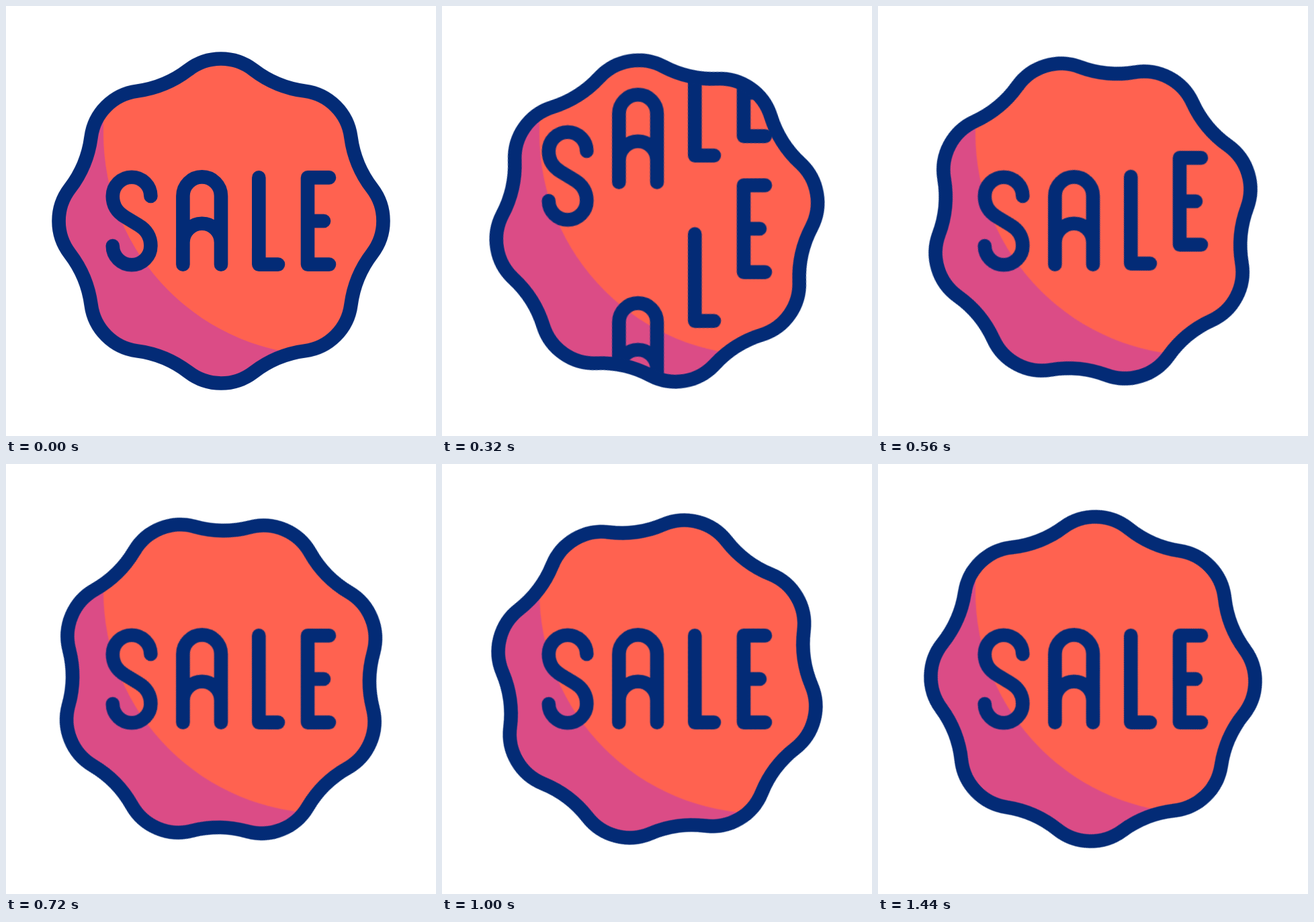
An HTML page that plays this animation: 640x640 px, repeating every 1480 ms.

```html
<!DOCTYPE html>
<html lang="en">
<head>
<meta charset="utf-8">
<title>Sale badge</title>
<style>
  html, body { margin: 0; width: 100%; height: 100%; overflow: hidden; background: #fff; }
  svg { display: block; width: 100vw; height: 100vh; }

  .line { fill: none; stroke: #032b76; stroke-width: 20.6; stroke-linecap: round; stroke-linejoin: round; }

  .spin, .unspin { transform-origin: 320px 320px; animation: spin 1480ms linear infinite; }
  .unspin { animation-direction: normal; animation-name: unspin; }
  @keyframes spin { to { transform: rotate(-45deg); } }
  @keyframes unspin { to { transform: rotate(45deg); } }

  /* each letter drops out while its copy follows from above */
  .letter { animation: 1480ms cubic-bezier(.3333, 0, .6667, 1) infinite; }
  .s.out { animation-name: s-out; }
  .a.out { animation-name: a-out; }
  .l.out { animation-name: l-out; }
  .e.out { animation-name: e-out; }
  .s.in { animation-name: s-in; --from: -315px; }
  .a.in { animation-name: a-in; --from: -328px; }
  .l.in { animation-name: l-in; --from: -326px; }
  .e.in { animation-name: e-in; --from: -323px; }

  @keyframes s-out { 0%, 2.703% { transform: translateY(0); } 27.027%, 100% { transform: translateY(320px); } }
  @keyframes a-out { 0%, 8.108% { transform: translateY(0); } 32.432%, 100% { transform: translateY(320px); } }
  @keyframes l-out { 0%, 13.514% { transform: translateY(0); } 37.838%, 100% { transform: translateY(320px); } }
  @keyframes e-out { 0%, 18.919% { transform: translateY(0); } 43.243%, 100% { transform: translateY(320px); } }

  @keyframes s-in { 0%, 2.703% { transform: translateY(var(--from)); } 29.73%, 100% { transform: translateY(0); } }
  @keyframes a-in { 0%, 2.703% { transform: translateY(var(--from)); } 35.135%, 100% { transform: translateY(0); } }
  @keyframes l-in { 0%, 4.054% { transform: translateY(var(--from)); } 39.189%, 100% { transform: translateY(0); } }
  @keyframes e-in { 0%, 2.703% { transform: translateY(var(--from)); } 45.946%, 100% { transform: translateY(0); } }
</style>
</head>
<body>
<svg viewBox="0 0 640 640" role="img" aria-label="SALE">
  <defs>
    <path id="badge"/>
    <clipPath id="inside"><use href="#badge"/></clipPath>
    <path id="s" d="M215.4 283A28.3 28.3 0 0 0 158.8 283C158.8 299 167 308 178 314.5L196.2 325.5C207.2 332 215.4 341 215.4 357A28.3 28.3 0 0 1 158.8 357"/>
    <path id="a" d="M263.4 384.7V282.7a28.3 28.3 0 0 1 56.6 0V384.7M263.4 352a28.3 28.3 0 0 1 56.6 0"/>
    <path id="l" d="M376.3 255.4V384.6H405"/>
    <path id="e" d="M481 255.4H449V384.6H481M449 320H473"/>
  </defs>

  <g class="spin">
    <g clip-path="url(#inside)">
      <g class="unspin">
        <rect width="640" height="640" fill="#db4c86"/>
        <path d="M145 0V190A330 330 0 0 0 475 520H640V0Z" fill="#ff6250"/>
        <g class="line">
          <use href="#s" class="letter s out"/>
          <use href="#a" class="letter a out"/>
          <use href="#l" class="letter l out"/>
          <use href="#e" class="letter e out"/>
          <use href="#s" class="letter s in"/>
          <use href="#a" class="letter a in"/>
          <use href="#l" class="letter l in"/>
          <use href="#e" class="letter e in"/>
        </g>
      </g>
    </g>
    <use href="#badge" class="line"/>
  </g>
</svg>
<script>
  // Eight round lobes joined by shallow hollows, all arcs tangent.
  const point = deg => {
    const a = deg * Math.PI / 180;
    return `${(320 + 230.2 * Math.sin(a)).toFixed(2)} ${(320 - 230.2 * Math.cos(a)).toFixed(2)}`;
  };
  const half = 12.14;
  let d = `M${point(-half)}`;
  for (let k = 0; k < 8; k++) {
    d += `A79.6 79.6 0 0 1 ${point(k * 45 + half)}`;
    d += `A160 160 0 0 0 ${point(k * 45 + 45 - half)}`;
  }
  document.getElementById('badge').setAttribute('d', d + 'Z');
</script>
</body>
</html>
```
